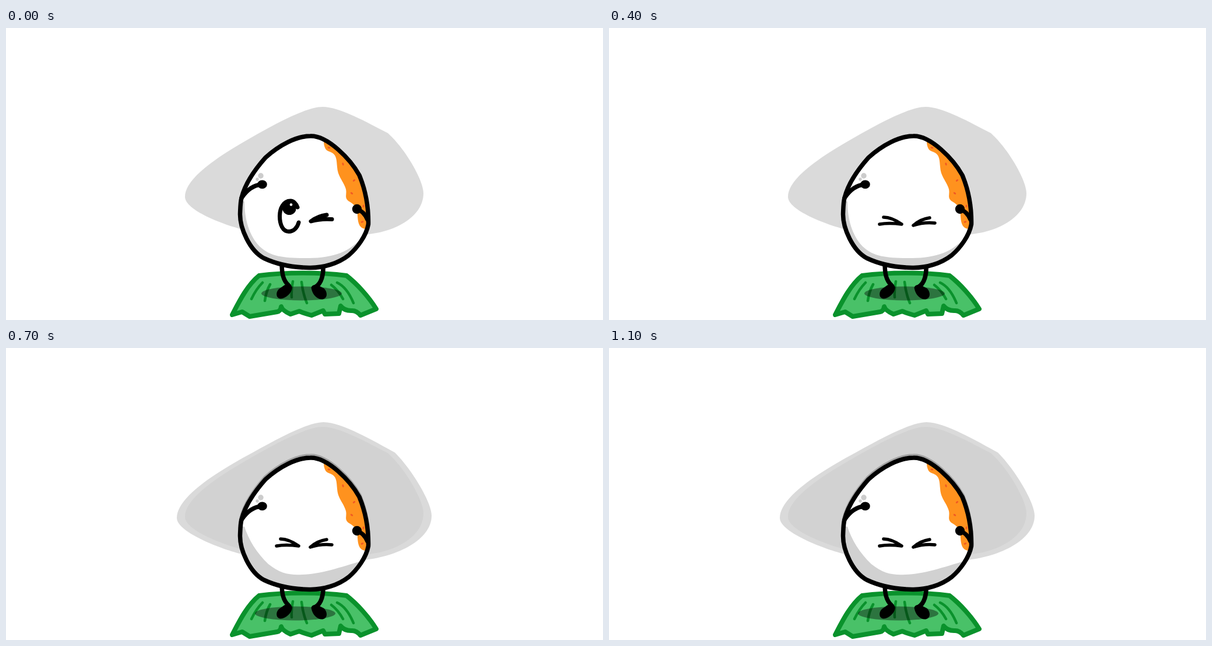
Recreate the animation shown at these times as an HTML page. Size 1024x500 px, loop 1200 ms.

```html
<!DOCTYPE html>
<html lang="en">
<head>
<meta charset="utf-8">
<title>Shivering egg</title>
<style>
  html, body { margin: 0; width: 100%; height: 100%; overflow: hidden; background: #fff; }
  svg { display: block; width: 1024px; height: 500px; }
  .line { fill: none; stroke: #000; stroke-width: 7.5; stroke-linecap: round; stroke-linejoin: round; }
  .face { stroke-width: 7; }
  .thin { stroke-width: 5.5; }
  .cloud { fill: #d0d0d0; fill-opacity: .78; }
  .shade { fill: #d1d1d1; }
  .leaf { fill: #49c168; stroke: #0a922c; stroke-width: 8; stroke-linejoin: round; }
  .veins { fill: none; stroke: #0a922c; stroke-width: 4.5; stroke-linecap: round; }
</style>
</head>
<body>
<svg viewBox="0 0 1024 500">
  <defs>
    <path id="egg" d="M522 185C552 184 591 225 606 252C616 276 622 306 621.500 336C618 356 602 377 588 389C570 403 545 411 520 410.5C492 410 463 404 442 394C418 381 401 343 401.5 318C402 306 402 298 404 291C410 266 429 240 445 222C468 201 498 185 522 185Z"/>
    <clipPath id="inside"><use href="#egg"/></clipPath>
    <path id="smallCloud" class="cloud" d="M543 135C572 135 620 162 655 180C687 209 716 262 716 283C716 322 670 348 622 353L520 370L402 344C372 336 307 312 307 289C307 258 360 222 420 188C462 164 515 135 543 135Z"/>
  </defs>

  <g id="ghost">
    <use href="#smallCloud"/>
    <use href="#egg" class="line"/>
  </g>
  <use id="cloudA" href="#smallCloud"/>
  <path id="cloudB" class="cloud" d="M545 127C576 127 632 160 667 179C698 210 730 265 730 287C730 329 670 357 615 363L520 375L405 353C374 346 293 316 293 291C293 258 350 219 414 184C458 160 515 127 545 127Z"/>

  <path class="leaf" d="M434 424C480 418 540 418 584 424C602 438 622 460 635 481L608 492Q601 483 592 484Q580 484 574 476L571 489L547 490L544 484L524 492Q510 488 503 485L488 490Q474 484 472 477Q471 485 465 486L418 494L405 486L388 491C400 468 414 440 434 424Z"/>
  <path class="veins" d="M440 436Q429 447 421 464M453 439Q446 451 444 467M492 434Q489 448 490 461M507 435Q509 454 516 471M558 440Q570 449 578 464M568 436Q585 444 596 471"/>
  <ellipse id="shadow" cx="507" cy="454.5" rx="69" ry="12" fill-opacity=".4"/>

  <path class="line" d="M473 402C473 420 475 432 485 441M544 405C545 422 541 438 531 443"/>
  <path d="M478 440C486 436 492 440 490.500 447C489 454 480 463 471 463.500C463 463 462 453 468 447Z"/>
  <path d="M524 447C522 441 530 438 536 441L545 445.500C552 452 552 463 543 464.500C533 465 526 456 524 447Z"/>

  <g id="body">
    <use href="#egg" fill="#fff"/>
    <g clip-path="url(#inside)">
      <path id="shadeA" class="shade" d="M409 297C409 327 417 355 435 374C455 393 480 394 520 394C560 394 592 383 612 356L640 430H380V297Z"/>
      <path id="shadeB" class="shade" d="M409 303C416 325 430 348 450 367C470 383 485 386 508 385C540 384 572 373 612 361L640 430H380V303Z"/>
      <path fill="#ff921e" d="M544 185L545.500 200C548 211 552 210 558 213C567 217 567 226 568 238C569 255 579 262 583 276C585 285 580 290 587 296C599 303 603 308 603 322C604 338 608 343 617 344L640 340V185Z"/>
      <g id="spots" fill="#f15a24"></g>
    </g>
    <g fill="#ccc"><circle cx="437" cy="253" r="4.700"/><circle cx="431" cy="259" r="2.700"/></g>
    <use href="#egg" class="line"/>
    <path class="line" d="M404 291C414 276 425 269 438 268M602 310Q614 314 620 328"/>
    <ellipse cx="439.500" cy="267.800" rx="8.300" ry="7.400"/>
    <circle cx="602" cy="310" r="8.200"/>

    <g id="wink">
      <path class="line face" d="M500 307C498 301 493 296 488 296C476 296 469.500 309 469.500 322C469.500 337 475 348.500 485 348.500C494 348.500 500 341 502 333M550 320Q535 322 523 331Q540 326 559 327.500"/>
      <ellipse cx="486" cy="309.500" rx="11.500" ry="10.500"/>
      <circle cx="489" cy="302.500" r="2.300" fill="#fff"/>
    </g>
    <path id="squint" class="line thin" d="M471 324Q485 324 502 336Q480 333 464 336M550 325Q535 327 522 338Q540 332 559 334"/>
  </g>
</svg>
<script>
  const el = id => document.getElementById(id);
  const show = (id, visible) => { el(id).style.display = visible ? "" : "none"; };
  const STEP = 100, STEPS = 12;

  el("spots").innerHTML = [[554, 205], [578, 233], [597, 261], [593, 283], [613, 305], [611, 332]]
    .map(([x, y], i) => `<ellipse cx="${x}" cy="${y}" rx="1.500" ry="2.500" transform="rotate(${i * 67 + 100} ${x} ${y})"/>`)
    .join("");

  function draw(time) {
    const step = Math.floor(time / STEP) % STEPS;
    const wide = step % 2 === 1;
    const low = step % 4 > 1;
    const winking = step < 4;
    show("cloudA", !wide);
    show("cloudB", wide);
    show("shadeA", !wide);
    show("shadeB", wide);
    show("wink", winking);
    show("squint", !winking);
    // The resting pose shines through the wide cloud on low squinting beats.
    show("ghost", wide && low && !winking);
    el("shadow").setAttribute("cx", wide ? 496 : 507);
    el("body").setAttribute("transform", `translate(0 ${low ? 3 : 0})`);
  }

  const start = performance.now();
  function tick() {
    draw(performance.now() - start);
    requestAnimationFrame(tick);
  }
  tick();
</script>
</body>
</html>
```
